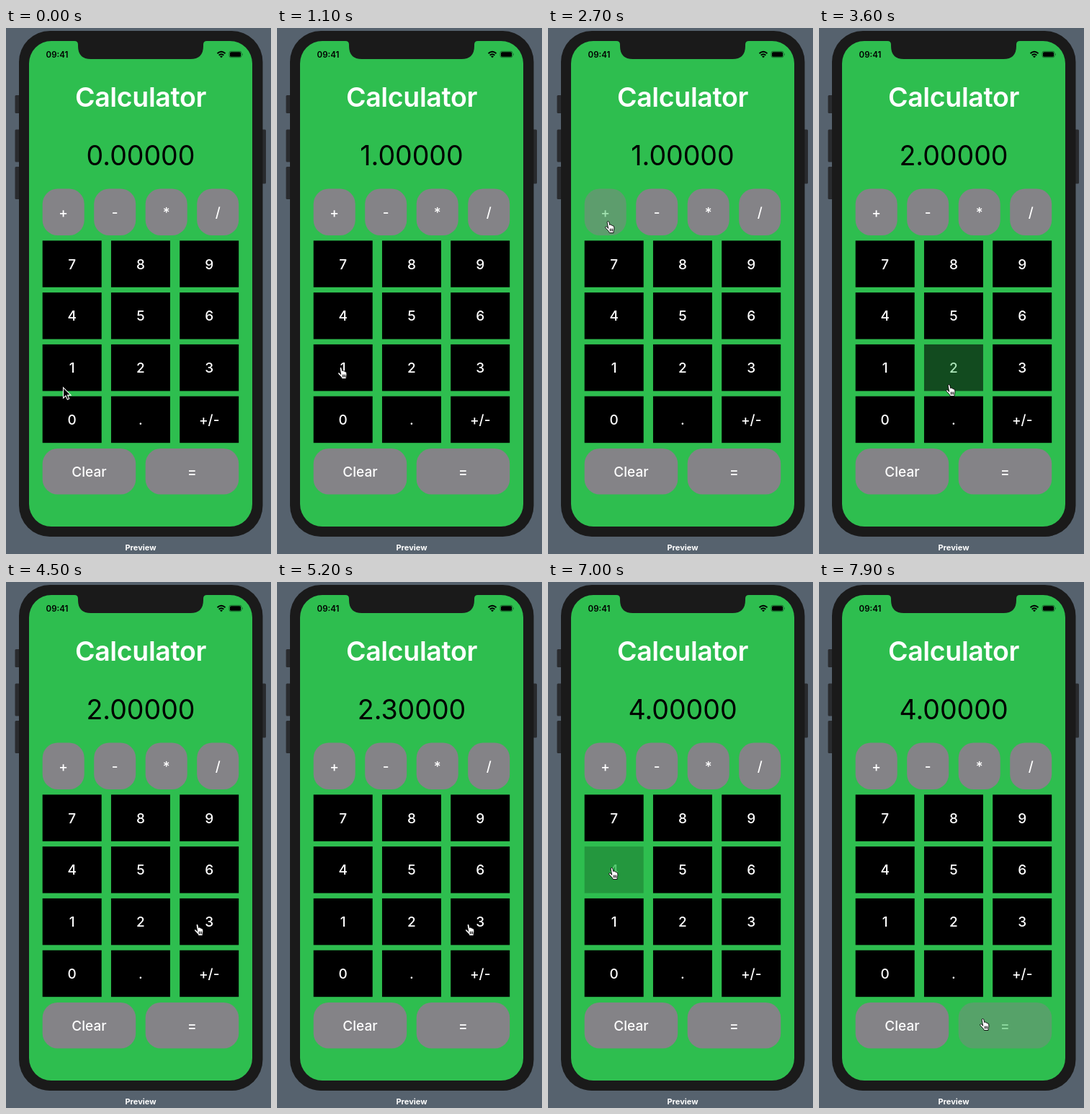
Recreate the animation shown at these times as an HTML page. Size 368x728 px, loop 8 s.

```html
<!DOCTYPE html>
<html lang="en">
<head>
<meta charset="utf-8">
<title>Calculator</title>
<style>
  html, body { margin: 0; width: 100%; height: 100%; overflow: hidden; background: #56626e; }
  svg { display: block; width: 368px; height: 728px; }
  text { font-family: Inter, Roboto, "Liberation Sans", sans-serif; text-anchor: middle; }
  #keys text { font-size: 19px; font-weight: 500; fill: #fff; }
</style>
</head>
<body>
<svg viewBox="0 0 368 728">
  <rect width="368" height="728" fill="#56626e"/>
  <g fill="#292b2e">
    <rect x="12.5" y="93" width="8" height="25" rx="1.5"/>
    <rect x="12.5" y="140.500" width="8" height="45" rx="1.5"/>
    <rect x="12.5" y="192" width="8" height="45" rx="1.5"/>
    <rect x="353" y="140.500" width="8" height="75" rx="1.5"/>
  </g>
  <rect x="18" y="4" width="338.500" height="700" rx="43" fill="#1a1a1a"/>
  <rect x="32" y="18" width="310" height="672" rx="31" fill="#2ebe4f"/>
  <path d="M95 17V18Q100 18 100 23V25Q100 43 118 43H256Q274 43 274 25V23Q274 18 279 18V17Z" fill="#1a1a1a"/>

  <text x="71" y="41" font-size="11.5" font-weight="600">09:41</text>
  <g fill="none" stroke="#000" stroke-width="1.9">
    <path d="M293.500 35.300Q299 30.300 304.500 35.300M295.700 37.700Q299 34.700 302.300 37.700"/>
  </g>
  <path d="M297 39.200Q299 37.600 301 39.200L299 41.200Z"/>
  <rect x="310" y="32.300" width="17" height="8.400" rx="2.4" fill="none" stroke="#145a26" stroke-width=".8"/>
  <rect x="311" y="33.300" width="15" height="6.400" rx="1.5"/>
  <path d="M328.200 35V38.200Q329.600 36.600 328.200 35Z" fill="#145a26"/>

  <text x="187" y="108.500" font-size="37.5" font-weight="600" letter-spacing="-.35" fill="#fff">Calculator</text>
  <text id="display" x="187" y="189.500" font-size="37.5"></text>
  <g id="keys"></g>
  <text x="187" y="723" font-size="11" font-weight="700" fill="#fff">Preview</text>

  <path id="arrow" d="M.5.5V15.200L4 12L6.300 17.200L8.700 16.100L6.500 11.100H11Z" fill="#000" stroke="#fff" stroke-width="1.1"/>
  <g id="hand" stroke="#000" stroke-width=".9" stroke-linejoin="round" stroke-linecap="round">
    <path fill="#fff" d="M4.600 10L3.200 2.200Q3 .5 4.400 .5Q5.600 .5 5.900 2L6.600 5.600Q7 4.600 8.100 5Q8.800 5.300 8.900 6.100Q10 5.300 10.800 6.800Q12.300 6.300 12.700 8.200Q13.300 11 12.200 13.300L12 16.500H6.300Q5.900 14.700 4.100 13.100L1 9.800Q0 8.300 1.200 7.900Q2.300 7.500 4.600 10Z"/>
    <path fill="none" d="M7.200 11V14M8.900 11V14M10.600 11V14"/>
  </g>
</svg>
<script>
const LOOP = 8000, STEP = 100;
const $ = id => document.getElementById(id);
const SVG_NS = "http://www.w3.org/2000/svg";
const keys = {};

function add(parent, tag, attrs) {
  const el = document.createElementNS(SVG_NS, tag);
  for (const name in attrs) el.setAttribute(name, attrs[name]);
  return parent.appendChild(el);
}

function addRow(labels, y, width, height, rounded) {
  const pitch = (272.500 - width) / (labels.length - 1);
  labels.forEach((label, i) => {
    const x = 50.700 + i * pitch;
    const key = keys[label] = add($("keys"), "g", {});
    add(key, "rect", { x, y, width, height, rx: rounded ? 21 : 0, fill: rounded ? "#848387" : "#000" });
    add(key, "text", { x: x + width / 2, y: y + height / 2 + 7 }).textContent = label;
  });
}

addRow(["+", "-", "*", "/"], 222.500, 58, 64.500, true);
["789", "456", "123"].forEach((row, i) => addRow([...row], 294.300 + i * 71.800, 82, 64.500));
addRow(["0", ".", "+/-"], 509.700, 82, 64.500);
addRow(["Clear", "="], 582, 129.500, 63.500, true);

// Each tap: key, time it acts, and the readout it leaves.
const taps = [
  ["1", 650, "1.00000"],
  ["+", 2525, "1.00000"],
  ["2", 3400, "2.00000"],
  [".", 3980, "2.00000"],
  ["3", 4750, "2.30000"],
  ["*", 5675, "1.000 + 2.300"],
  ["4", 7000, "4.00000"],
  ["=", 7950, "4.00000"]
];

// Cursor stops: time, x, y.
const stops = [
  [0, 79, 497], [200, 79, 497], [500, 84, 469], [1500, 84, 469],
  [1900, 76, 490], [2200, 48, 370], [2450, 79, 267], [2750, 79, 267],
  [3250, 176, 493], [3600, 176, 493], [3850, 181, 539], [4100, 181, 539],
  [4500, 261, 473], [5200, 261, 473], [5550, 209, 281], [6200, 209, 281],
  [6800, 84, 395], [7200, 84, 395], [7800, 223, 604], [8000, 223, 604]
];

// Dims quickly on touch, recovers slowly after release.
function keyOpacity(dt) {
  if (dt < -150 || dt > 400) return 1;
  return dt < 0 ? 0.2 - dt / 150 * 0.8 : 0.2 + dt / 400 * 0.8;
}

function cursorAt(t) {
  const i = stops.findIndex(stop => stop[0] > t);
  const [t0, x0, y0] = stops[i - 1], [t1, x1, y1] = stops[i];
  const u = (t - t0) / (t1 - t0), k = u * u * (3 - 2 * u);
  return [x0 + (x1 - x0) * k, y0 + (y1 - y0) * k];
}

function render(t) {
  let readout = "0.00000";
  for (const [label, time, result] of taps) {
    keys[label].setAttribute("opacity", keyOpacity(t - time));
    if (t >= time) readout = result;
  }
  $("display").textContent = readout;

  const pointing = t >= 200;
  const place = `translate(${cursorAt(t)})`;
  for (const id of ["arrow", "hand"]) {
    $(id).setAttribute("transform", place);
    $(id).setAttribute("visibility", (id === "hand") === pointing ? "visible" : "hidden");
  }
}

const start = performance.now();
function tick() {
  const t = (performance.now() - start) % LOOP;
  render(Math.floor(t / STEP) * STEP);
  requestAnimationFrame(tick);
}
tick();
</script>
</body>
</html>
```
